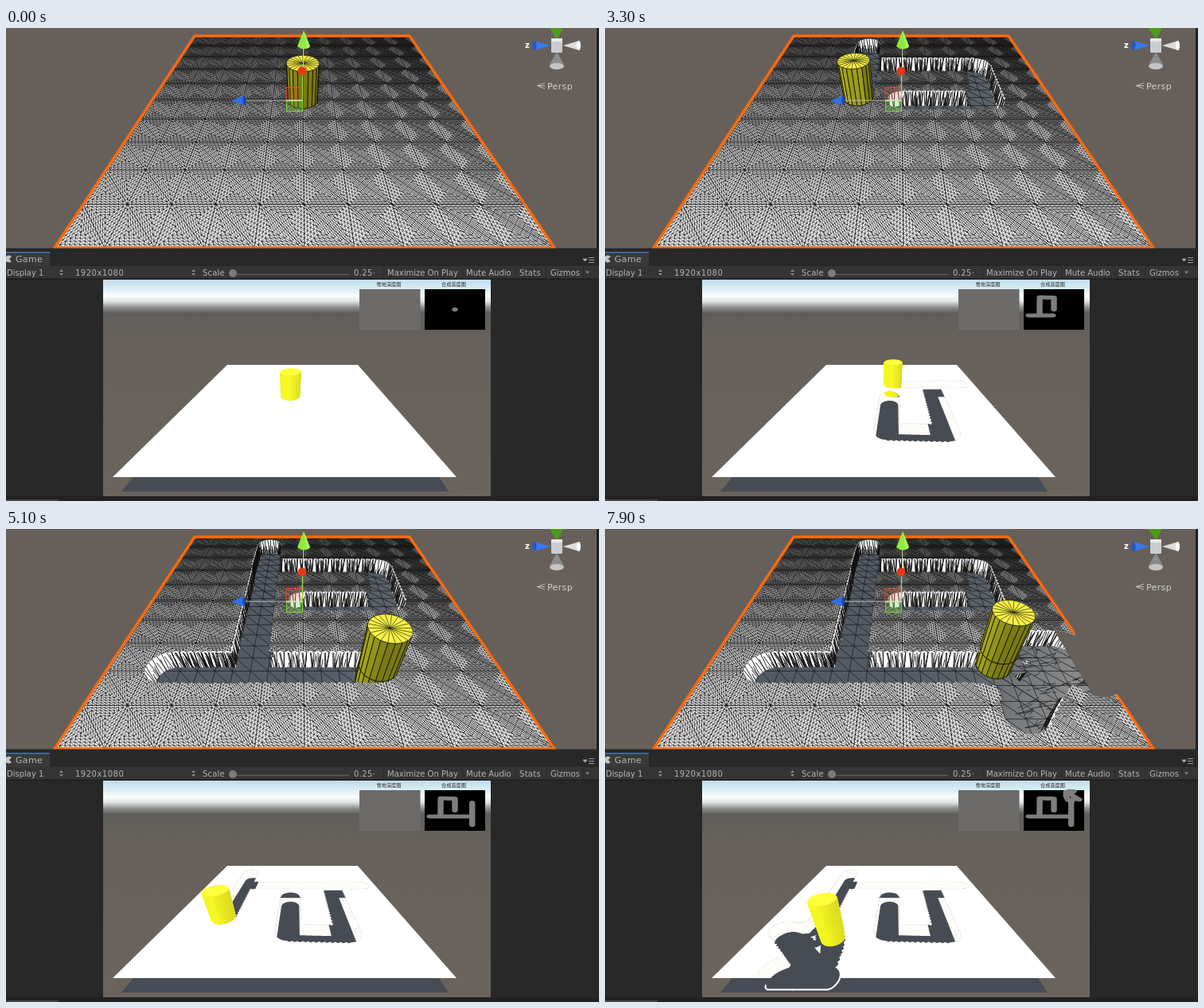
Animation of 745x594 px, one loop 8000 ms. Source, as an HTML page with a canvas:

```html
<!DOCTYPE html>
<html lang="en">
<head>
<meta charset="utf-8">
<title>Snow trail</title>
<style>
html, body { margin: 0; width: 100%; height: 100%; overflow: hidden; background: #282828; }
canvas, svg { position: absolute; left: 0; top: 0; width: 745px; height: 594px; }
text { font: 10px "DejaVu Sans", sans-serif; fill: #b4b4b4; }
.big { font-size: 11px; letter-spacing: .35px; }
.cjk { font: 6.2px "Noto Sans CJK SC", "Noto Sans CJK", sans-serif; fill: #222; text-anchor: middle; }
</style>
</head>
<body>
<canvas id="c" width="745" height="594"></canvas>
<svg viewBox="0 0 745 594">
  <!-- move handles -->
  <path d="M300 91H372" stroke="#bbb" stroke-width="1"/>
  <path d="M373.500 24V50" stroke="#c8d8b8"/>
  <path d="M372.500 54V104" stroke="#8ee03c" stroke-width="1.200"/>
  <path d="M352 90.500V74.500H372" fill="none" stroke="#e04a30"/>
  <rect x="352" y="75" width="20" height="15" fill="#f04020" fill-opacity=".18"/>
  <rect x="352.500" y="91.500" width="20" height="13" fill="#60d030" fill-opacity=".25" stroke="#7ed63a"/>
  <path d="M352 91H372" stroke="#eee"/>
  <path d="M374 3L366 23Q374 30 382 23Z" fill="#8fe83c"/>
  <path d="M374 3L378 26Q381 25 382 23Z" fill="#a9f45e"/>
  <circle cx="372" cy="54" r="5.500" fill="#e23a1c"/>
  <path d="M283 91L299 85Q303 91 299 97Z" fill="#2f6ff0"/>
  <ellipse cx="299.500" cy="91" rx="2" ry="6" fill="#1c46a8"/>
  <!-- orientation gizmo -->
  <path d="M683 0H700L693 13H691Z" fill="#4f9a1c"/>
  <path d="M692 30L683 46Q692 52 701 46Z" fill="#8c8c8c"/>
  <ellipse cx="692" cy="48" rx="9" ry="4" fill="#c4c4c4"/>
  <path d="M684 22L664 16Q660 22 664 28Z" fill="#3a78f0"/>
  <ellipse cx="664" cy="22" rx="2.500" ry="6" fill="#2757c0"/>
  <path d="M700 22L720 16Q724 22 720 28Z" fill="#dcdcdc"/>
  <ellipse cx="719.500" cy="22" rx="2.500" ry="6" fill="#fff"/>
  <rect x="685" y="13" width="14" height="18" rx="1" fill="#c9ccd0"/>
  <path d="M685 13H699V17H685Z" fill="#e6e8ea"/>
  <text x="652" y="25" style="font-weight:bold;fill:#fff">z</text>
  <path d="M677 69L667 72.500L677 76M667 72.500H677" fill="none" stroke="#bbb"/>
  <text class="big" x="680" y="77" style="fill:#d2d2d2">Persp</text>
  <!-- panel bars -->
  <rect x="742" width="3" height="277" fill="#202020"/>
  <rect y="277" width="745" height="22" fill="#282828"/>
  <rect y="281" width="55" height="18" fill="#3a3a3a"/>
  <rect y="281" width="55" height="1.500" fill="#3a79bb"/>
  <rect y="299" width="745" height="16" fill="#353535"/>
  <rect y="314.500" width="745" height="1.500" fill="#1f1f1f"/>
  <path d="M7 287A4.500 4.500 0 1 0 7 293L4 290Z" fill="#c4c4c4"/>
  <text class="big" x="12" y="294">Game</text>
  <path d="M725 290h5l-2.500 3ZM732 288.500h7M732 291.500h7M732 294.500h7" fill="#aaa" stroke="#aaa" stroke-width=".9"/>
  <text x="1" y="310.500">Display 1</text>
  <text x="87" y="310.500" letter-spacing=".5">1920x1080</text>
  <text x="247" y="311" letter-spacing=".2">Scale</text>
  <text x="437" y="311" letter-spacing=".4">0.25·</text>
  <text x="479" y="310.500">Maximize On Play</text>
  <text x="578" y="310.500">Mute Audio</text>
  <text x="645" y="310.500" letter-spacing=".3">Stats</text>
  <text x="684" y="310.500">Gizmos</text>
  <path d="M67 306h5l-2.500-3ZM67 308h5l-2.500 3ZM233 306h5l-2.500-3ZM233 308h5l-2.500 3ZM728 305.500h5l-2.500 3Z" fill="#8a8a8a"/>
  <path d="M290 309.500H431" stroke="#5a5a5a" stroke-width="1.500"/>
  <circle cx="285" cy="308" r="5" fill="#7c7c7c"/>
  <path d="M474.500 300v14M573.500 300v14M640.500 300v14M678.500 300v14M725.500 300v14" stroke="#2b2b2b"/>
  <rect y="588" width="745" height="6" fill="#222"/>
  <rect y="592" width="66" height="2" fill="#444"/>
  <text class="cjk" x="481" y="323.500">雪地深度图</text>
  <text class="cjk" x="562.500" y="323.500">合成高度图</text>
</svg>
<script>
const ctx = document.getElementById('c').getContext('2d');
const LOOP = 8000, STEP = 100, START = 800, R = 0.049, TAU = Math.PI * 2;
const mix = (a, b, t) => a + (b - a) * t;

// time, position left to right, position far to near
const KEYS = [
  [800, .5, .5], [1400, .792, .5], [1700, .8, .265], [2400, .351, .262],
  [2700, .355, .08], [3500, .355, .62], [3700, .355, .75], [3800, .34, .785],
  [4100, .165, .785], [4200, .144, .785], [5100, .691, .785], [5300, .775, .805],
  [6200, .785, .88], [6400, .77, .92], [6700, .81, .87], [7000, .885, .79],
  [7100, .945, .79], [7300, .97, .83], [7400, .975, .76], [7500, .96, .7],
  [7700, .86, .7], [7900, .762, .729]
];

function posAt(t) {
  let i = 0;
  while (i < KEYS.length - 2 && KEYS[i + 1][0] < t) i++;
  const [p, q] = [KEYS[i], KEYS[i + 1]];
  const u = Math.min(1, Math.max(0, (t - p[0]) / (q[0] - p[0])));
  return [mix(p[1], q[1], u), mix(p[2], q[2], u)];
}

// perspective of the unit plane; h moves along the vertical vanishing point
function camera({ cx, w, y, vx, vy, axes }) {
  return (a, b, h = 0) => {
    const [side, depth] = axes(a, b);
    const d = mix(1 / w[0], 1 / w[1], depth), u = (1 / d - w[0]) / (w[1] - w[0]);
    const f = d / (d - h);
    const px = mix(cx[0], cx[1], u) + side / d, py = mix(y[0], y[1], u);
    return [vx + (px - vx) * f, vy + (py - vy) * f];
  };
}

const scene = {
  p: camera({ cx: [372, 375], w: [270, 628], y: [10, 276], vx: 373, vy: 470, axes: (a, b) => [a - .5, b] }),
  up: .000285, floor: -.000135, box: [0, 0, 742, 276.5], back: '#67605a', wall: '#fff', sides: 20
};
const game = {
  p: camera({ cx: [360, 350], w: [164, 432], y: [423, 564], vx: 355, vy: 750, axes: (a, b) => [.5 - b, a] }),
  up: .0004, floor: -.00018, box: [122, 316, 487, 272], back: '#474c54', wall: '#fcfcf9', sides: 48
};
const mapView = { p: (a, b) => [526 + 76 * b, 379 - 51 * a] };

function poly(path, pts) {
  pts.forEach(([x, y], i) => i ? path.lineTo(x, y) : path.moveTo(x, y));
  path.closePath();
  return path;
}

const ring = ([a, b], n) => Array.from({ length: n }, (_, i) =>
  [a + R * Math.cos(i / n * TAU), b - R * Math.sin(i / n * TAU)]);

// both long sides of one trail piece, with a toothed rim
function sides(p, q, tooth) {
  const dx = q[0] - p[0], dy = q[1] - p[1], len = Math.hypot(dx, dy) || 1;
  const n = Math.max(2, Math.round(len / .01));
  const line = s => Array.from({ length: n + 1 }, (_, i) => {
    const r = s * (R + (i % 2 ? tooth : 0)), u = i / n;
    return [p[0] + dx * u - dy / len * r, p[1] + dy * u + dx / len * r];
  });
  return [line(1), line(-1)];
}

function sweep(view, trail, h, tooth = .006) {
  const path = new Path2D(), put = pts => poly(path, pts.map(([a, b]) => view.p(Math.min(a, h ? 1 : 2), b, h)));
  trail.forEach((q, i) => {
    put(ring(q, 24));
    if (!i) return;
    const [l, r] = sides(trail[i - 1], q, tooth);
    put([...l, ...r.reverse()]);
  });
  return path;
}

function line(path, p, q) {
  path.moveTo(p[0], p[1]);
  path.lineTo(q[0], q[1]);
}

// nested triangles joined by zigzags
function tessellate(path, tri, N) {
  const g = [0, 1].map(k => (tri[0][k] + tri[1][k] + tri[2][k]) / 3);
  const at = (e, i, n) => {
    const s = n / N, u = n ? i / n : 0, p = tri[e], q = tri[(e + 1) % 3];
    return scene.p(...[0, 1].map(k => g[k] + (mix(p[k], q[k], u) - g[k]) * s));
  };
  for (let n = N; n > 0; n -= 2) for (let e = 0; e < 3; e++) {
    for (let i = 0; i < n; i++) {
      const p = at(e, i, n), m = n - 2;
      line(path, p, at(e, i + 1, n));
      line(path, p, at(e, Math.max(0, Math.min(m, i - 1)), m));
      if (i) line(path, p, at(e, Math.min(m, i), m));
    }
  }
}

function meshPath() {
  const path = new Path2D();
  for (let i = 0; i < 10; i++) for (let j = 0; j < 10; j++) {
    const [a, b, c, d] = [[0, 0], [1, 0], [1, 1], [0, 1]].map(([x, y]) => [(i + x) / 10, (j + y) / 10]);
    tessellate(path, [a, b, c], 10);
    tessellate(path, [a, c, d], 10);
  }
  return path;
}

function floorGrid() {
  const path = new Path2D(), P = (a, b) => scene.p(a, b, scene.floor);
  for (let i = 0; i <= 20; i++) {
    const u = i / 20;
    line(path, P(u, 0), P(u, 1));
    line(path, P(0, u), P(1, u));
    line(path, P(u, 0), P(1, 1 - u));
    line(path, P(0, u), P(1 - u, 1));
  }
  return path;
}

const quad = (view, h = 0) => poly(new Path2D(), [[0, 0], [1, 0], [1, 1], [0, 1]].map(([a, b]) => view.p(a, b, h)));

function fill(c, color, path) {
  c.fillStyle = color;
  c.fill(path);
}

function gradient(c, x0, y0, x1, y1, stops) {
  const g = c.createLinearGradient(x0, y0, x1, y1);
  stops.forEach(([o, color]) => g.addColorStop(o, color));
  return g;
}

function staticLayer() {
  const cv = document.createElement('canvas');
  cv.width = 745;
  cv.height = 594;
  const c = cv.getContext('2d');
  c.fillStyle = '#282828';
  c.fillRect(0, 0, 745, 594);
  c.fillStyle = scene.back;
  c.fillRect(...scene.box);
  fill(c, '#fff', quad(scene));
  c.strokeStyle = '#0c0c0c';
  c.lineWidth = .6;
  c.stroke(meshPath());

  c.fillStyle = gradient(c, 0, 316, 0, 588, [
    [0, '#bfdcea'], [.045, '#dceef5'], [.075, '#fbfdfd'], [.1, '#dfe4e5'],
    [.13, '#8a8a88'], [.155, '#605e5b'], [.3, '#67615b'], [1, '#6b645d']]);
  c.fillRect(...game.box);
  fill(c, game.back, poly(new Path2D(), [[160, 564], [544, 564], [556, 582], [145, 582]]));
  fill(c, '#fff', quad(game));
  c.fillStyle = '#6c6b6a';
  c.fillRect(444, 328, 76.5, 51);
  c.fillStyle = '#000';
  c.fillRect(526, 328, 76, 51);
  return cv;
}

function cylinder(view, pos, lo, hi) {
  const wire = view === scene, n = view.sides, base = ring(pos, n);
  const low = base.map(([a, b]) => view.p(a, b, lo)), top = base.map(([a, b]) => view.p(a, b, hi));
  ctx.lineWidth = .9;
  for (let i = 0; i < n; i++) {
    const j = (i + 1) % n, [p, q, r] = [low[i], low[j], top[j]];
    if ((q[0] - p[0]) * (r[1] - p[1]) - (q[1] - p[1]) * (r[0] - p[0]) > 0) continue;
    const ang = (i + .5) / n * TAU, nx = Math.cos(ang), ny = Math.sin(ang);
    const lum = wire
      ? Math.min(.92, .48 + .25 * Math.max(0, -nx - .3) + 1.4 * Math.max(0, .45 - pos[0]) * (nx < .5))
      : .97 - .1 * Math.max(0, ny);
    const color = `rgb(${255 * lum | 0},${255 * lum | 0},${wire ? 45 * lum | 0 : 34})`;
    const face = poly(new Path2D(), [p, q, r, top[i]]);
    fill(ctx, color, face);
    ctx.strokeStyle = wire ? '#15150a' : color;
    ctx.stroke(face);
  }
  if (hi <= 0) return;
  const cap = poly(new Path2D(), top);
  fill(ctx, wire ? '#f8f048' : '#ffff3c', cap);
  if (!wire) return;
  const mid = view.p(...pos, hi);
  top.forEach(p => line(cap, mid, p));
  ctx.strokeStyle = '#2a2a10';
  ctx.lineWidth = .7;
  ctx.stroke(cap);
}

function wallLines(trail) {
  const path = new Path2D();
  const drop = ([a, b], i) => line(path, scene.p(a, b), scene.p(a + (i % 2 ? .006 : -.003), b, scene.floor));
  trail.forEach((q, i) => {
    if (i) sides(trail[i - 1], q, 0).forEach(s => s.forEach(drop));
    ring(q, 24).forEach(drop);
  });
  ctx.strokeStyle = '#111';
  ctx.lineWidth = .9;
  ctx.stroke(path);
}

// dark creases on the last part of the floor
function creases(trail) {
  let seed = 7;
  const rnd = () => (seed = seed * 16807 % 2147483647) / 2147483647 - .5;
  const path = new Path2D();
  trail.slice(56).forEach(([a, b]) => {
    for (let i = 0; i < 5; i++) {
      const x = a + rnd() * .08, y = b + rnd() * .08;
      line(path, scene.p(x, y, scene.floor), scene.p(x + .03 + rnd() * .04, y - .01 + rnd() * .02, scene.floor));
    }
  });
  ctx.stroke(path);
}

function drawView(view, trail) {
  const pos = trail[trail.length - 1], wire = view === scene;
  const hole = sweep(view, trail, 0), floor = sweep(view, trail, view.floor, 0);
  ctx.save();
  ctx.beginPath();
  ctx.rect(...view.box);
  ctx.clip();

  ctx.save();
  if (!wire) {
    const open = sweep(view, trail.filter(p => p[0] > .93), view.floor, 0);
    ctx.strokeStyle = '#fff';
    ctx.lineWidth = 4;
    ctx.stroke(open);
    hole.addPath(open);
  }
  ctx.clip(hole);
  fill(ctx, view.back, hole);
  fill(ctx, view.wall, quad(view));
  if (wire) {
    wallLines(trail);
    const f = view.floor;
    fill(ctx, view.back, poly(new Path2D(), [view.p(1, 0), view.p(1.05, 0), view.p(1.05, 1), view.p(1, 1), view.p(1, 1, f), view.p(1, 0, f)]));
  }
  fill(ctx, wire ? gradient(ctx, 400, 150, 580, 220, [[0, '#545b65'], [.4, '#62676d'], [1, '#8b8b8a']]) : view.back, floor);
  if (wire) {
    ctx.save();
    ctx.clip(floor);
    ctx.strokeStyle = '#15181c';
    ctx.lineWidth = .7;
    ctx.stroke(grid);
    creases(trail);
    ctx.restore();
  }
  cylinder(view, pos, view.floor, 0);
  ctx.restore();

  cylinder(view, pos, 0, view.up);
  if (wire) border(trail);
  ctx.restore();
}

// selection outline, open where the trail breaks the right edge
function border(trail) {
  const cut = trail.filter(p => p[0] > .953).map(p => p[1]);
  const from = cut.length ? Math.min(...cut) - .04 : .5, to = cut.length ? Math.max(...cut) + .04 : .5;
  ctx.beginPath();
  [[1, from], [1, 0], [0, 0], [0, 1], [1, 1], [1, to]].forEach(([a, b]) => ctx.lineTo(...scene.p(a, b)));
  ctx.strokeStyle = '#ff6a0a';
  ctx.lineWidth = 3.4;
  ctx.lineJoin = 'round';
  ctx.stroke();
}

const grid = floorGrid(), backdrop = staticLayer();
let shown = -1;

function draw(now) {
  const k = Math.max(0, Math.floor((now % LOOP - START) / STEP));
  if (k !== shown) {
    shown = k;
    const trail = Array.from({ length: k + 1 }, (_, i) => posAt(START + i * STEP));
    ctx.drawImage(backdrop, 0, 0);
    drawView(scene, trail);
    drawView(game, trail);
    fill(ctx, '#7d7d7d', sweep(mapView, trail, 0, 0));
  }
  requestAnimationFrame(draw);
}
const origin = performance.now();
const tick = () => draw(performance.now() - origin);
requestAnimationFrame(function loop() {
  draw = (f => now => f(now))(draw);
  tick();
});
</script>
</body>
</html>
```
